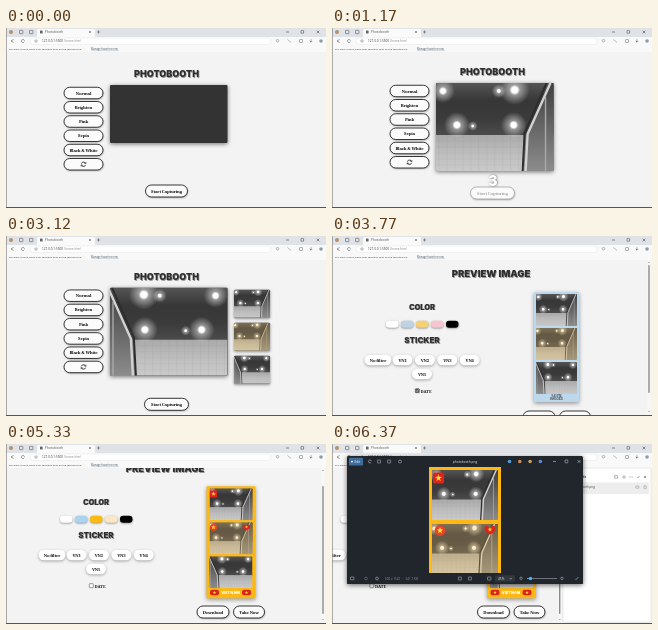
These frames come from a looping animation (320 px wide and 180 px high, 6.5 s). An HTML page with a canvas:

```html
<!DOCTYPE html>
<html lang="en">
<head>
<meta charset="utf-8">
<title>Photobooth</title>
<style>
html, body { margin: 0; width: 100%; height: 100%; overflow: hidden; background: #f3f3f3; }
canvas { display: block; width: 100vw; height: 100vh; }
</style>
</head>
<body>
<canvas id="stage"></canvas>
<script>
const LOOP = 6500, STEP = 130;
const canvas = document.getElementById('stage');
const c = canvas.getContext('2d');
const UI = '"Open Sans", sans-serif', SERIF = '"Noto Serif", serif', HEAVY = 'Inter, sans-serif';

// Each row: start time, value
const at = (table, t) => table.reduce((v, row) => t >= row[0] ? row[1] : v, null);
const TINT = [[0, 'plain'], [650, 'grey'], [1950, 'sepia'], [2730, 'grey']];
const PICKED = [[0, -1], [650, 4], [910, -1], [1950, 3], [2210, -1], [2600, 5], [2730, -1]];
const COUNT = [[0, ''], [1040, '3'], [1300, '2'], [1430, '1'], [1560, ''],
  [2210, '3'], [2340, '2'], [2470, '1'], [2600, ''], [2730, '3'], [2860, '2'], [2990, '1'], [3120, '']];
const SHOTS = [[0, 0], [1560, 1], [2600, 2], [3120, 3]];
const STRIP = [[0, '#ffffff'], [3640, '#bcd8ec'], [3900, '#f7d27a'], [4160, '#f6c3cf'], [4810, '#fdb813']];
const SCROLL = [[0, 0], [5200, 5], [5330, 13]];

function box(x, y, w, h, fill, r = 0, line, lw = 0.8) {
  c.beginPath();
  c.roundRect(x, y, w, h, r);
  if (fill) { c.fillStyle = fill; c.fill(); }
  if (line) { c.strokeStyle = line; c.lineWidth = lw; c.stroke(); }
}
function shaded(blur, color, dx, dy, draw) {
  c.save();
  const k = canvas.width / 320;
  c.shadowColor = color; c.shadowBlur = blur * k;
  c.shadowOffsetX = dx * k; c.shadowOffsetY = dy * k;
  draw();
  c.restore();
}
function text(s, x, y, size, o = {}) {
  c.font = `${o.weight || 400} ${size}px ${o.font || UI}`;
  c.letterSpacing = (o.gap || 0) + 'px';
  c.textAlign = o.align || 'left';
  c.textBaseline = 'alphabetic';
  c.fillStyle = o.color || '#333';
  c.fillText(s, x, y);
}
function path(pts, color, lw = 0.6, fill) {
  c.beginPath();
  pts.forEach(([x, y], i) => i ? c.lineTo(x, y) : c.moveTo(x, y));
  if (fill) { c.closePath(); c.fillStyle = fill; c.fill(); }
  else { c.strokeStyle = color; c.lineWidth = lw; c.stroke(); }
}
function ring(x, y, r, color, lw = 0.6, a = 0, b = 7) {
  c.beginPath();
  c.arc(x, y, r, a, b);
  c.strokeStyle = color; c.lineWidth = lw; c.stroke();
}
function dot(x, y, r, color) {
  c.beginPath();
  c.arc(x, y, r, 0, 7);
  c.fillStyle = color; c.fill();
}
function ramp(y0, y1, ...stops) {
  const g = c.createLinearGradient(0, y0, 0, y1);
  stops.forEach((s, i) => g.addColorStop(i / (stops.length - 1), s));
  return g;
}
function cross(x, y, r, color) {
  path([[x - r, y - r], [x + r, y + r]], color);
  path([[x + r, y - r], [x - r, y + r]], color);
}

// Room seen by the camera, in a 118 x 88 space
function room(x, y, w, h, tint, flip, dx = 0) {
  c.save();
  c.beginPath(); c.roundRect(x, y, w, h, 1); c.clip();
  c.translate(x, y); c.scale(w / 118, h / 88);
  if (flip) { c.translate(118, 0); c.scale(-1, 1); }
  box(0, 0, 118, 53, ramp(0, 53, '#555', '#373737', '#3b3b3b', '#4c4c4c'));
  box(0, 52, 118, 36, ramp(52, 88, '#a9a9a9', '#bebebe', '#cacaca'));
  c.globalAlpha = 0.25;
  for (let i = 1; i < 6; i++) path([[0, 52 + i * 6], [90, 52 + i * 6]], '#888', 0.4);
  for (let i = 0; i < 12; i++) path([[i * 8 + 3, 52], [i * 8 + 3, 88]], '#888', 0.4);
  c.globalAlpha = 1;
  c.translate(dx, 0);
  path([[92, 52], [115, 0], [140, 0], [140, 88], [88, 88], [88, 52]], '', 0, ramp(0, 88, '#3e3e3e', '#666', '#8c8c8c'));
  path([[111, 0], [89, 50], [87, 88]], '#2d2d2d', 2);
  path([[115, 0], [92, 51], [90, 88]], '#d2d2d2', 2.4);
  path([[110, 14], [110, 88]], '#aaa', 1.4);
  for (const [lx, ly, r] of [[7, 8, 12], [63, 8, 7], [79, 7, 15], [21, 42, 13], [78, 42, 13], [37, 43, 5]]) {
    const g = c.createRadialGradient(lx, ly, 0, lx, ly, r);
    g.addColorStop(0, '#fff'); g.addColorStop(0.2, '#fff');
    g.addColorStop(0.35, '#ffffff70'); g.addColorStop(1, '#ffffff00');
    dot(lx, ly, r, g);
  }
  c.translate(-dx, 0);
  if (tint !== 'grey') {
    const sepia = tint === 'sepia';
    c.globalCompositeOperation = 'screen';
    box(0, 0, 118, 88, sepia ? '#3a342a' : '#0c0a06');
    c.globalCompositeOperation = 'multiply';
    box(0, 0, 118, 88, sepia ? '#ffedc4' : '#fff5e6');
  }
  c.restore();
}
function shot(i, x, y, w, h) {
  room(x, y, w, h, i === 1 ? 'sepia' : 'grey', i === 2, [0, -3, 5][i]);
}

function browser() {
  box(0, 0, 320, 9, '#dfe3e8');
  box(31, 1, 58, 9, '#fafafa', 1.5);
  box(0, 9, 320, 15, '#f9f9f9');
  dot(5, 4, 2, '#b98f68');
  box(13.5, 2.3, 3.4, 3.4, null, 0.6, '#555', 0.6);
  box(23.5, 2.3, 3.4, 3.4, null, 0.6, '#555', 0.6);
  box(34, 2.5, 2.6, 3, '#666', 0.4);
  text('Photobooth', 39, 5.3, 3.3, { color: '#555' });
  cross(84, 4, 0.9, '#555');
  path([[91, 4], [94, 4]], '#555'); path([[92.5, 2.5], [92.5, 5.5]], '#555');
  path([[280, 4], [283, 4]], '#444');
  box(295, 2.6, 2.6, 2.6, null, 0, '#444', 0.5);
  cross(312, 4, 1.3, '#444');
  path([[7.5, 11.5], [5, 13], [7.5, 14.5]], '#555');
  ring(17, 13, 1.5, '#555', 0.6, 0.5, 6);
  box(24, 10, 241, 6.5, '#fff', 3, '#ddd', 0.4);
  ring(30, 13, 1.2, '#666', 0.5);
  text('127.0.0.1:5500', 36, 14.2, 3.1, { color: '#333' });
  text('/home.html', 58, 14.2, 3.1, { color: '#888' });
  ring(271.5, 12.7, 1.3, '#777', 0.5);
  path([[281.5, 11.5], [285, 14.5]], '#777', 0.5);
  box(293.5, 11.5, 3, 3, null, 0.5, '#666', 0.5);
  path([[305, 11.2], [305, 14], [303.8, 13], [305, 14.2], [306.2, 13]], '#555', 0.5);
  dot(315, 13, 1.8, '#8aa0b4');
  text('For quick access, place your favorites here on the favorites bar.', 3, 22, 2.5, { color: '#222' });
  text('Manage favorites now', 85, 22, 2.6, { color: '#456' });
  path([[85, 22.6], [113, 22.6]], '#789', 0.3);
}

function heading(s, x, y, size) {
  const o = { font: HEAVY, weight: 900, align: 'center' };
  text(s, x + 0.8, y + 0.9, size, { ...o, color: '#9a9a9a' });
  text(s, x, y, size, { ...o, color: '#2e2e2e' });
}
function label(s, x, y, color = '#111') {
  text(s, x, y + 1.5, 4.3, { font: SERIF, weight: 800, gap: -0.2, align: 'center', color });
}
function pill(s, x, y, w, h, off) {
  shaded(2, '#0005', 0.5, 1, () => box(x - w / 2, y - h / 2, w, h, '#fbfbfb', h / 2));
  box(x - w / 2, y - h / 2, w, h, null, h / 2, off ? '#aaa' : '#222', 0.9);
  label(s, x, y, off ? '#aaa' : '#111');
}

function booth(t) {
  const live = t >= 260, shots = at(SHOTS, t), count = at(COUNT, t), picked = at(PICKED, t);
  const d = !live ? 2 : shots > 2 ? -3.3 : 0;
  heading('PHOTOBOOTH', 160.5, 47 + d, 9);
  ['Normal', 'Brighten', 'Pink', 'Sepia', 'Black & White', ''].forEach((name, i) => {
    const y = 63 + d + i * 14.25, hot = i === picked;
    if (hot) {
      const g = c.createLinearGradient(56, 0, 99, 0);
      g.addColorStop(0, '#666'); g.addColorStop(1, '#aaa');
      shaded(3, '#0006', 0, 1, () => box(56, y - 6.5, 43, 13, g, 6.5, '#444', 0.7));
      label(name, 77.5, y, '#fff');
    } else pill(name, 77.5, y, 39, 11.5);
    if (i === 5) {
      const k = hot ? '#fff' : '#222';
      ring(77.5, y, 2.2, k, 0.8, 0.3, 2.8);
      ring(77.5, y, 2.2, k, 0.8, 3.4, 5.9);
      path([[78.2, y - 1], [79.9, y - 0.6], [79.9, y - 2.3]], k, 0.6);
      path([[76.8, y + 1], [75.1, y + 0.6], [75.1, y + 2.3]], k, 0.6);
    }
  });
  const h = live ? 88 : 58;
  shaded(4, '#0008', 0, 1, () => box(104, 55 + d, 117.5, h, '#333', 1));
  if (live) {
    const sway = t < 1950 ? Math.sin((t - 1170) / 260) * 1.5 : t < 2730 ? -3 + Math.sin((t - 2080) / 260) : 5 + Math.sin((t - 3120) / 260);
    room(104, 55 + d, 117.5, 88, at(TINT, t), t >= 2600, sway);
  }
  for (let i = 0; i < shots; i++) {
    const y = 57 + d + i * 33;
    shaded(3, '#0007', 0, 1, () => box(228, y, 36, 28, '#444', 1.5));
    shot(i, 228, y, 36, 28);
  }
  pill('Start Capturing', 160.5, 165 - d, live ? 44 : 42, 12, count);
  if (count) shaded(2, '#0009', 0.4, 0.6, () =>
    text(count, 161, 157.5, 14, { font: HEAVY, weight: 900, align: 'center', color: '#fff' }));
}

function star(x, y, r, color) {
  const pts = Array.from({ length: 10 }, (_, i) => {
    const a = i * Math.PI / 5 - Math.PI / 2, q = i % 2 ? r * 0.4 : r;
    return [x + q * Math.cos(a), y + q * Math.sin(a)];
  });
  path(pts, '', 0, color);
}
function heart(x, y, r) {
  c.beginPath();
  c.moveTo(x, y + r);
  c.bezierCurveTo(x - r * 2, y - r * 0.2, x - r, y - r * 1.5, x, y - r * 0.45);
  c.bezierCurveTo(x + r, y - r * 1.5, x + r * 2, y - r * 0.2, x, y + r);
  c.fillStyle = '#dc241f'; c.fill();
  star(x, y - r * 0.1, r * 0.5, '#ffdf2e');
}
function badge(x, y, r, square) {
  if (square) box(x - r, y - r, r * 2, r * 2, '#dc241f', r * 0.35);
  else dot(x, y, r, '#e2452c');
  star(x, y, r * 0.65, '#ffdf2e');
}

function strip(x, y, t, sticker, date) {
  const w = sticker ? 49 : 45, hh = sticker ? 112 : 110, pad = sticker ? 3 : 2;
  shaded(4, '#0006', 0, 1.5, () => box(x, y, w, hh, at(STRIP, t), 1));
  for (let i = 0; i < 3; i++) shot(i, x + pad, y + 2 + i * 34, w - pad * 2, 32);
  if (date) {
    const o = { font: SERIF, weight: 800, align: 'center', color: '#333' };
    text('9:41 PM', x + w / 2, y + 105, 2.6, o);
    text('09/03/2025', x + w / 2, y + 108.4, 2.6, o);
  }
  if (sticker) {
    badge(x + 7, y + 7.5, 3.6, true);
    badge(x + 7, y + 41, 3.6);
    heart(x + 40, y + 41, 3.2);
    for (const bx of [8, 40]) {
      box(x + bx - 4.5, y + 103.5, 9, 5.4, '#dc241f', 2);
      star(x + bx, y + 106.3, 1.8, '#ffdf2e');
    }
    text('VIET NAM', x + 24, y + 107.8, 3.6, { font: HEAVY, weight: 900, align: 'center', color: '#fff' });
  }
}

function preview(t) {
  const panel = t >= 5720, sticker = t >= 5070, date = t < 5070;
  c.save();
  c.beginPath(); c.rect(0, 24, panel ? 230 : 320, 155); c.clip();
  c.translate(panel ? -45.5 : 0, -at(SCROLL, t));
  heading('PREVIEW IMAGE', 159, 41.3, 9.5);
  heading('COLOR', 90, 73.5, 7.4);
  heading('STICKER', 90, 107, 8);
  const hues = t < 4810 ? ['#fff', '#bdd3e4', '#f4cf74', '#f5c6d0', '#000'] : ['#fff', '#a9d3ef', '#fdbb12', '#fbe7c6', '#000'];
  hues.forEach((hue, i) => shaded(2, '#0006', 0, 0.8, () => box(54 + i * 15, 84.7, 12.5, 7, hue, 3.2)));
  const tag = (s, x, y, w) => {
    shaded(3, '#0005', 0, 1, () => box(x - w / 2, y - 5.3, w, 10.6, '#fff', 5.3));
    label(s, x, y);
  };
  tag('No filter', 46, 124, 27);
  ['VN1', 'VN2', 'VN3', 'VN4'].forEach((s, i) => tag(s, 70.5 + i * 22.4, 124, 20));
  tag('VN5', 90, 138, 20);
  box(83.3, 152.7, 4, 4, date ? '#555' : '#fff', 0.6, '#555', 0.6);
  if (date) path([[84.2, 154.7], [85, 155.6], [86.5, 153.6]], '#fff', 0.6);
  text('DATE', 88.5, 156.5, 4.2, { font: SERIF, weight: 800, gap: -0.1, color: '#222' });
  strip(sticker ? 200.5 : 202, sticker ? 55.3 : 56, t, sticker, date);
  pill('Download', 207, 181, 32, 12);
  pill('Take Now', 243, 181, 31, 12);
  c.restore();
  const sx = panel ? 227.7 : 317;
  box(sx - 1.5, 24, 3.4, 154, '#f7f7f7');
  path([[sx - 0.8, 27], [sx, 26], [sx + 0.8, 27]], '#777', 0.5);
  box(sx - 0.7, 29 + at(SCROLL, t), 1.4, 128, '#8b8b8b', 0.7);
  path([[sx - 0.8, 175], [sx, 176], [sx + 0.8, 175]], '#777', 0.5);
  if (panel) downloads();
}

function downloads() {
  box(231, 24, 88, 154, '#fff', 1, '#d5d5d5', 0.5);
  text('Downloads', 235, 34.3, 3.6, { weight: 600, color: '#333' });
  box(282.6, 31.6, 3, 2.6, null, 0.3, '#666', 0.5);
  ring(292, 33, 1.2, '#666', 0.5);
  for (let i = -1; i < 2; i++) dot(299 + i * 1.2, 33, 0.4, '#666');
  path([[304.8, 33], [306, 34], [307.5, 31.8]], '#666', 0.5);
  cross(313, 33, 1.1, '#555');
  box(233, 38.5, 84, 11.5, '#ededed', 1);
  box(235, 41, 3, 3.6, '#999', 0.4);
  text('photobooth.png', 240, 44, 3, { color: '#444' });
  text('Open file', 240, 48, 2.7, { color: '#6b8299' });
  box(303.8, 42, 3, 2.2, null, 0.3, '#888', 0.5);
  box(312, 41.8, 2.2, 2.8, null, 0.3, '#888', 0.5);
}

function viewer() {
  const ink = '#c5cace';
  shaded(5, '#0009', 0, 1, () => box(15, 12, 236, 128, '#20262b', 1.5));
  box(17, 13.8, 14, 7.6, '#3f6d9c', 1);
  text('Edit', 22.5, 18.8, 3.1, { color: '#fff' });
  dot(20, 17.6, 0.9, '#fff');
  ring(38, 17.5, 1.5, ink, 0.6, 0.6, 6);
  box(45.6, 16, 3, 3, null, 0.3, ink, 0.5);
  box(55.6, 16, 3, 3, null, 0.3, ink, 0.5);
  ring(68, 17.5, 1.5, ink, 0.5);
  text('photobooth.png', 133, 18.7, 3.2, { align: 'center', color: '#e5e5e5' });
  ['#4a9edb', '#d48a55', '#c8a35c', '#5b8ad0'].forEach((hue, i) => dot(177.5 + i * 10.3, 17.5, 1.8, hue));
  path([[221, 17.5], [224, 17.5]], ink);
  box(233, 16, 2.8, 2.8, null, 0, ink, 0.5);
  cross(247, 17.5, 1.4, ink);

  box(97, 23, 72, 106, '#fdb813');
  shot(0, 100, 26, 66, 50);
  c.save();
  c.beginPath(); c.rect(97, 23, 72, 106); c.clip();
  shot(1, 100, 80, 66, 50);
  c.restore();
  badge(106.5, 34, 5.6, true);
  badge(108, 86.5, 5.4);
  heart(158, 86, 4.8);

  box(15, 129, 236, 11, '#20262b', 1);
  box(18.5, 133, 3.4, 2.8, null, 0.3, ink, 0.5);
  heart(34, 134.5, 0);
  ring(34, 134.5, 1.4, '#7c8489', 0.5);
  ring(45, 134.5, 1.4, ink, 0.5);
  text('600 x 1520   ·   241.7 KB', 53, 135.7, 3, { color: '#8d969c' });
  box(126.4, 133, 3, 3, null, 0.3, ink, 0.5);
  box(136.4, 133, 3, 3, null, 0.3, ink, 0.5);
  box(155.5, 133, 3.5, 3, null, 0.3, ink, 0.5);
  box(163, 131.2, 20, 6.6, '#30383e', 1);
  text('45%', 166, 135.8, 3.2, { color: '#eee' });
  path([[177.5, 134], [178.7, 135.2], [180, 134]], ink, 0.5);
  ring(189, 134.3, 1.2, ink, 0.5);
  path([[195, 134.5], [225, 134.5]], '#8d969c', 0.7);
  path([[195, 134.5], [198.5, 134.5]], '#58b1ee', 0.8);
  dot(198.5, 134.5, 1.7, '#58b1ee');
  ring(230, 134.3, 1.2, ink, 0.5);
  path([[243.5, 136], [246.5, 133]], ink, 0.6);
}

function draw(t) {
  c.setTransform(canvas.width / 320, 0, 0, canvas.height / 180, 0, 0);
  box(0, 0, 320, 180, '#f3f3f3');
  browser();
  if (t < 3250) booth(t); else preview(t);
  box(0, 0, 0.6, 180, '#777');
  box(0, 179, 320, 1, '#555');
  if (t >= 6110) viewer();
}

const start = performance.now();
let shown = '';
function tick(now) {
  const t = Math.floor((Math.max(0, now - start) % LOOP) / STEP) * STEP;
  const ratio = window.devicePixelRatio || 1;
  const w = Math.round(innerWidth * ratio), h = Math.round(innerHeight * ratio);
  const key = [t, w, h].join();
  if (key !== shown) {
    if (canvas.width !== w || canvas.height !== h) { canvas.width = w; canvas.height = h; }
    draw(t);
    shown = key;
  }
  requestAnimationFrame(tick);
}
tick(start);
</script>
</body>
</html>
```
